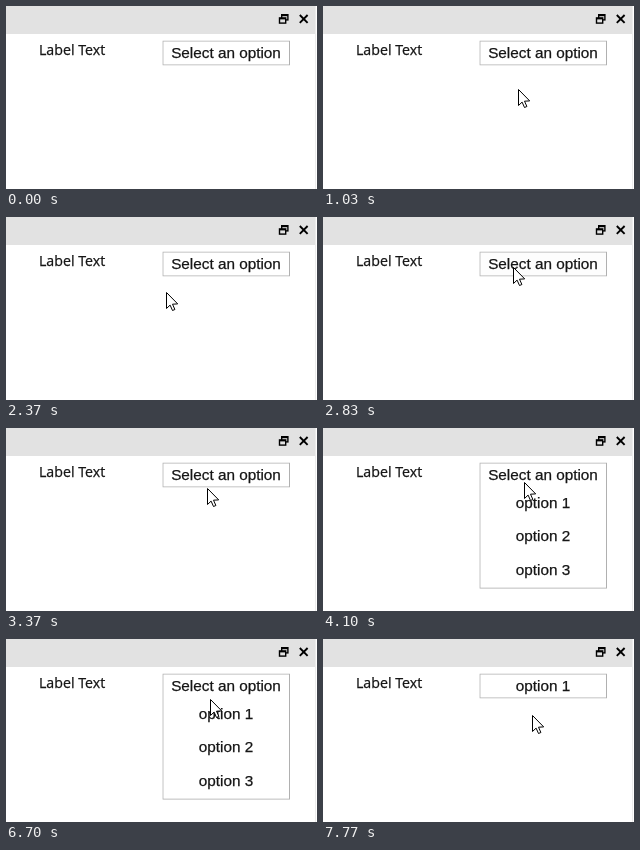
Write an HTML page with a canvas that moves like this. It is 311x183 px and loops after 8 s.

```html
<!DOCTYPE html>
<html lang="en">
<head>
<meta charset="utf-8">
<title>Dropdown</title>
<style>
  html, body { margin: 0; width: 100%; height: 100%; overflow: hidden; background: #fff; }
  canvas { display: block; width: 311px; height: 183px; }
</style>
</head>
<body>
<canvas id="stage" width="311" height="183"></canvas>
<script>
const ctx = document.getElementById('stage').getContext('2d');
const LOOP = 8000, RATE = 15;
const INK = '#161616', BORDER = '#b0b0b0', BAR = '#e2e2e2';
const LEFT = 156.4, RIGHT = 284, TOP = 34.5, CLOSED = 59.5, OPEN = 160.7;

// Times below are in ticks of 1/15 s.
const ENTER = 7, CLICK = 57, PICK = 114, FOLD = 3;
const TOGGLES = [59, 81, 89, PICK];

const glide = (from, to, x, y) => ({ from, to, x, y });
const GLIDES = [
  glide(7, 9, 214, 79),
  glide(13, 21, 181, 86),
  glide(22, 28, 161.5, 54),
  glide(33, 35, 160, 75),
  glide(35, 42, 190, 50),
  glide(44, 48, 200, 100),
  glide(48, 52, 201, 54),
  glide(70, 77, 202, 46),
  glide(99, 100, 204, 60),
  glide(100, 104, 202, 82),
  glide(107, 110, 209, 76)
];

const mix = (a, b, k) => a + (b - a) * k;

function easeOut(tick, from, to) {
  const k = Math.min(1, Math.max(0, (tick - from) / (to - from)));
  return 1 - (1 - k) ** 3;
}

function pointerAt(tick) {
  let x = 229, y = 117;
  for (const g of GLIDES) {
    const k = easeOut(tick, g.from, g.to);
    x = mix(x, g.x, k);
    y = mix(y, g.y, k);
  }
  return { x: Math.round(x), y: Math.round(y) };
}

// Every second toggle closes the list again.
function opennessAt(tick) {
  return TOGGLES.reduce((open, t, i) =>
    mix(open, 1 - i % 2, easeOut(tick, t - 1, t - 1 + FOLD)), 0);
}

function box(x, y, w, h, color) {
  ctx.fillStyle = color;
  ctx.fillRect(x, y, w, h);
}

function text(str, x, y, font, align) {
  ctx.font = font;
  ctx.textAlign = align;
  ctx.fillStyle = ctx.strokeStyle = INK;
  ctx.lineWidth = 0.25;
  ctx.fillText(str, x, y);
  ctx.strokeText(str, x, y);
}

function item(str, y) {
  text(str, 220, y, '15.3px "Liberation Sans", Arial, sans-serif', 'center');
}

function miniWindow(x, y) {
  box(x, y, 7.6, 6.6, '#000');
  box(x + 1.4, y + 2.2, 4.8, 3, BAR);
}

function closeIcon(x, y, size) {
  ctx.strokeStyle = '#000';
  ctx.lineWidth = 1.9;
  ctx.beginPath();
  ctx.moveTo(x, y);
  ctx.lineTo(x + size, y + size);
  ctx.moveTo(x + size, y);
  ctx.lineTo(x, y + size);
  ctx.stroke();
}

function drawPanel() {
  box(0, 0, 311, 183, '#fff');
  box(0, 0, 309, 28, BAR);
  box(309, 0, 1, 183, '#ececec');
  miniWindow(275, 8);
  miniWindow(272.8, 11.2);
  closeIcon(293.8, 9, 7.8);
  text('Label Text', 33, 49, '14.2px "Open Sans", "Noto Sans", sans-serif', 'left');
}

function drawDropdown(open, label, hover) {
  const isOpen = open > 0.001;
  const full = isOpen ? OPEN : CLOSED;
  const width = RIGHT - LEFT;
  ctx.save();
  ctx.beginPath();
  ctx.rect(LEFT, TOP, width, mix(CLOSED, OPEN, open) - TOP);
  ctx.clip();
  box(LEFT, TOP, width, full - TOP, BORDER);
  box(LEFT + 1, TOP + 1, width - 2, full - TOP - 2, hover ? '#fdfdfd' : '#fff');
  item(label, 52);
  for (let n = 1; isOpen && n <= 3; n++) item('option ' + n, Math.round(46 + 33.6 * n));
  ctx.restore();
}

const ARROW = new Path2D('M0 0V16L3.6 12.6 6 18 8.4 17 6 11.7 11.2 11.4Z');

function drawPointer({ x, y }) {
  ctx.save();
  ctx.translate(x + 0.5, y + 0.5);
  ctx.fillStyle = '#fff';
  ctx.fill(ARROW);
  ctx.strokeStyle = '#000';
  ctx.lineWidth = 1;
  ctx.stroke(ARROW);
  ctx.restore();
}

function draw(now) {
  // Ticks are offset by just under half a step from the loop start.
  const tick = Math.floor((now % LOOP) / 1000 * RATE - 0.4);
  const pointer = pointerAt(tick);
  const hover = tick >= ENTER && tick < CLICK && pointer.y < CLOSED;
  drawPanel();
  drawDropdown(opennessAt(tick), tick < PICK ? 'Select an option' : 'option 1', hover);
  if (tick >= ENTER) drawPointer(pointer);
}

const start = performance.now();
function loop() {
  draw(performance.now() - start);
  requestAnimationFrame(loop);
}
loop();
</script>
</body>
</html>
```
